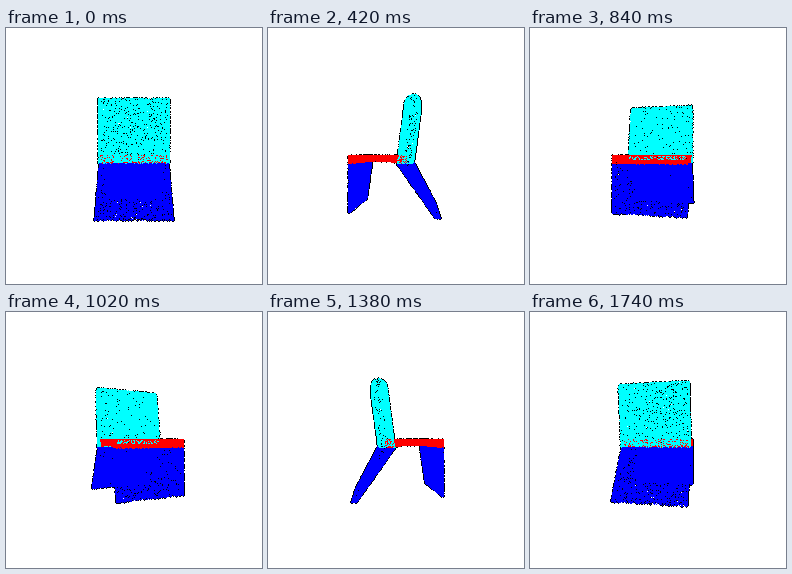
Recreate the animation shown at these times as a matplotlib script. Size 256 by 256 pixels, loop 1800 ms.

```python
import numpy as np
import matplotlib.pyplot as plt
from matplotlib.animation import FuncAnimation

SIZE = 256
FRAMES = 30
INTERVAL = 60
CAMERA = 231  # distance from the turning axis

CYAN, RED, BLUE = (0, 255, 255), (255, 0, 0), (0, 0, 255)
DOT = np.array([[0, 0]])
CROSS = np.array([[0, 0], [0, 1], [0, -1], [1, 0], [-1, 0]])

rng = np.random.default_rng(4)


def mix(a, b, t):
    return a + (b - a) * t


def slab(count, top, bottom, cap=0):
    """Points on a slanted slab; each end is (height, half width, v0, v1)."""
    t = rng.random(count)
    height, width, v0, v1 = (mix(a, b, t) for a, b in zip(top, bottom))
    across = rng.uniform(-1, 1, count)
    depth = rng.integers(0, 2, count).astype(float)
    side = rng.random(count) < 0.12
    across[side] = np.sign(across[side])
    depth[side] = rng.random(side.sum())
    if cap:
        d = np.clip((top[0] - height) / cap, 0, 1)
        depth = 0.5 + (depth - 0.5) * np.sqrt(1 - (1 - d) ** 2)
    return np.column_stack([across * width, height, mix(v0, v1, depth)])


def seat(count, width=32.4, front=-38.3, rear=9):
    t = rng.random(count)
    across = rng.uniform(-1, 1, count)
    level = rng.integers(0, 2, count).astype(float)
    side = rng.random(count) < 0.4
    across[side] = np.sign(across[side])
    end = rng.random(count) < 0.15
    t[end] = np.round(t[end])
    edge = side | end
    level[edge] = rng.random(edge.sum())
    under = -4.4 - 2.4 * (2 * t - 1) ** 2
    return np.column_stack(
        [across * width, mix(under, 0.5, level), mix(front, rear, t)])


# points, colour, share of points with a black rim
parts = [
    (slab(13000, (52.6, 32.2, 12, 24.8), (-6.8, 32.7, 4.2, 16.8), cap=6.5),
     CYAN, 0.3),
    (seat(11000), RED, 0.02),
    (slab(11000, (-7, 32.2, -38.3, -31.2), (-49.8, 32, -39, -37.3)), BLUE, 0.3),
    (slab(12500, (-7, 32.2, 4.2, 16.8), (-53, 32.3, 37, 41.2)), BLUE, 0.3),
]
points = np.vstack([p for p, _, _ in parts])
colors = np.vstack([np.tile(c, (len(p), 1)) for p, c, _ in parts])
rimmed = np.concatenate([rng.random(len(p)) < share for p, _, share in parts])


def stamp(img, x, y, shape, color):
    """Paint a small shape at every point, later ones on top."""
    for dx, dy in shape:
        img[y + dy, x + dx] = color


def render(i):
    a = 2 * np.pi * i / FRAMES
    u, h, v = points.T
    x = u * np.cos(a) + v * np.sin(a)
    z = v * np.cos(a) - u * np.sin(a)
    scale = CAMERA / (CAMERA - z)
    px = np.floor(SIZE / 2 + x * scale).astype(int)
    py = np.floor(SIZE / 2 - h * scale).astype(int)
    img = np.full((SIZE, SIZE, 3), 255, np.uint8)
    stamp(img, px[rimmed], py[rimmed], CROSS, 0)
    order = np.argsort(z)
    stamp(img, px[order], py[order], DOT, colors[order])
    return img


fig = plt.figure(figsize=(2.56, 2.56), dpi=100)
ax = fig.add_axes([0, 0, 1, 1])
ax.axis("off")
view = ax.imshow(render(0), interpolation="nearest", aspect="auto")


def update(i):
    view.set_data(render(i))
    return [view]


anim = FuncAnimation(fig, update, frames=FRAMES, interval=INTERVAL,
                     repeat=True, repeat_delay=0)
plt.show()
```
